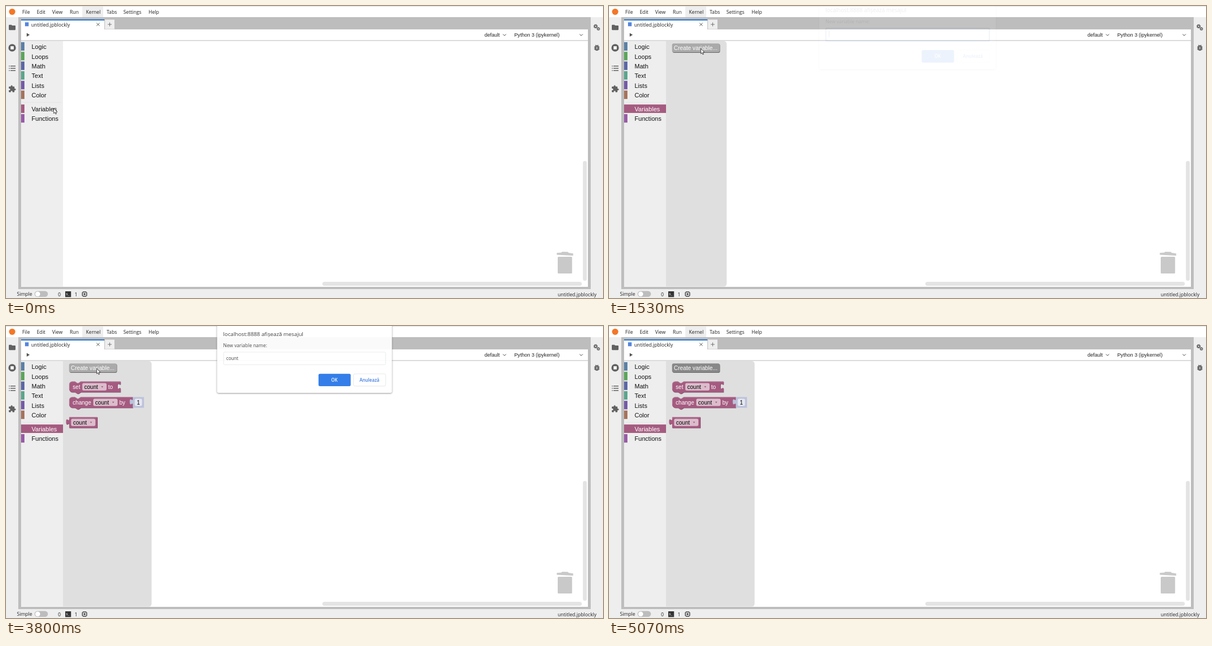
These frames come from a looping animation (1068x524 px, 5.79 s). An HTML page:

```html
<!DOCTYPE html>
<html lang="en">
<head>
<meta charset="utf-8">
<title>Creating a block variable</title>
<style>
  html, body { margin: 0; width: 100%; height: 100%; overflow: hidden; background: #fff; }
  svg { display: block; width: 1068px; height: 524px; }
  text { white-space: pre; }
  .ui { font-family: "Open Sans", "Noto Sans", sans-serif; }
  .arial { font-family: "Liberation Sans", Arial, sans-serif; }
</style>
</head>
<body>
<svg id="stage" viewBox="0 0 1068 524" xmlns="http://www.w3.org/2000/svg"></svg>
<script>
const LOOP = 5790;
const PINK = '#a55b80', ICON = '#616161';

const rect = (x, y, w, h, fill, extra = '') =>
  `<rect x="${x}" y="${y}" width="${w}" height="${h}" fill="${fill}" ${extra}/>`;
const label = (font, size) => (x, y, str, fill = '#212121', extra = '') =>
  `<text class="${font}" font-size="${size}" x="${x}" y="${y}" fill="${fill}" ${extra}>${str}</text>`;
const path = (d, fill, extra = '') => `<path d="${d}" fill="${fill}" ${extra}/>`;
const line = (d, color, width = 1, extra = '') =>
  path(d, 'none', `stroke="${color}" stroke-width="${width}" ${extra}`);
const at = (x, y, scale, body) => `<g transform="translate(${x} ${y}) scale(${scale})">${body}</g>`;

const menuText = label('ui', 8.7);
const kernelText = label('arial', 9.1);
const categoryText = label('arial', 11.1);
const buttonText = label('arial', 10.25);
const blockText = label('arial', 14.67);

function menuBar() {
  const items = [['File', 29], ['Edit', 55], ['View', 82.5], ['Run', 114], ['Kernel', 143],
    ['Tabs', 180], ['Settings', 210], ['Help', 255]];
  return rect(0, 0, 1068, 1, '#e0e0e0') + rect(136.5, 1, 37.5, 19, '#eee') +
    '<circle cx="11" cy="10.3" r="5.6" fill="#f37726"/>' +
    items.map(([name, x]) => menuText(x, 14, name)).join('');
}

function gear(x, y, r) {
  const tooth = 2 * Math.PI * r / 16;
  return `<g fill="none" stroke="${ICON}"><circle cx="${x}" cy="${y}" r="${r * .65}" stroke-width="${r * .55}"/>
    <circle cx="${x}" cy="${y}" r="${r}" stroke-width="${r * .4}" stroke-dasharray="${tooth}"/></g>`;
}

function sideBars() {
  const folder = 'M10 4H4c-1.1 0-2 .9-2 2v12c0 1.1.9 2 2 2h16c1.1 0 2-.9 2-2V8c0-1.1-.9-2-2-2h-8l-2-2z';
  const puzzle = 'M20.5 11H19V7c0-1.1-.9-2-2-2h-4V3.5a2.5 2.5 0 0 0-5 0V5H4c-1.1 0-2 .9-2 2v3.8h1.5' +
    'a2.7 2.7 0 0 1 0 5.4H2V20c0 1.1.9 2 2 2h3.8v-1.5a2.7 2.7 0 0 1 5.4 0V22H17c1.1 0 2-.9 2-2v-4h1.5a2.5 2.5 0 0 0 0-5z';
  const list = [107.8, 111.8, 115.8].map(y => line(`M5.2 ${y}h1.5M8 ${y}h9`, ICON, 1.4)).join('');
  const bug = line('M4 9H20M4 13H20M4 17H20M7.8 3.8L11 7M16.2 3.8L13 7', ICON, 2) +
    rect(6, 5, 12, 16, ICON, 'rx="6"') + line('M10 11h4M10 15h4', '#eee', 2);
  return rect(0, 20, 22, 488, '#eee') + rect(1046, 20, 22, 488, '#eee') +
    at(3.8, 31.3, .6, path(folder, ICON)) +
    `<circle cx="11" cy="75" r="6.7" fill="${ICON}"/>` + rect(8.2, 72.2, 5.6, 5.6, '#fff') +
    list + at(3.8, 141.6, .6, path(puzzle, ICON)) +
    gear(1054.8, 36.4, 3.2) + gear(1059.7, 41, 2.6) + at(1049.8, 67.6, .6, bug);
}

function tabs() {
  return rect(22, 20, 1024, 488, '#bdbdbd') + rect(27, 42, 1014, 462, '#fff') +
    rect(27, 24, 149, 18, '#fff') + rect(27, 24, 149, 2, '#2878cc') +
    rect(34, 29.3, 6.5, 7, '#5585dc') + menuText(45, 37, 'untitled.jpblockly') +
    line('M162 30.4l5.4 5.4M167.4 30.4l-5.4 5.4', '#555', 1) +
    rect(177, 24.5, 17, 17, '#eee') + line('M182 33h7M185.5 29.5v7', '#666', .9) +
    path('M37 48.4l5.4 3.3-5.4 3.3z', '#555') +
    kernelText(856, 54.7, 'default') + kernelText(909.3, 54.7, 'Python 3 (ipykernel)') +
    line('M889 50.5l2.8 2.8 2.8-2.8M1026.2 50.5l2.8 2.8 2.8-2.8', '#444', 1) +
    rect(27, 61.5, 1014, 1, '#b5b8bb');
}

function workspace() {
  return rect(1032, 278, 7, 215, '#e4e4e4', 'rx="3.5"') + rect(566, 495, 464, 7, '#e4e4e4', 'rx="3.5"') +
    rect(987, 450, 25.7, 30, '#c9c9c9', 'rx="1.5"') +
    path('M985.4 443l7.8-.4 2-1.7 9.6.4 2 1.7 7.8 1.1v3.8l-29.2-1.5z', '#c9c9c9');
}

function statusBar() {
  const pins = [-2, 0, 2].map(d => `M${140.5 + d} 512v10M135.5 ${517 + d}h10`).join('');
  return rect(0, 508, 1068, 16, '#eee') + menuText(19.5, 520, 'Simple') +
    rect(51, 511.5, 24, 10.5, '#bdbdbd', 'rx="5.2"') + '<circle cx="56.7" cy="516.8" r="4.4" fill="#fff"/>' +
    menuText(93, 521, '0') + rect(106, 512, 10.3, 10.3, '#333') + label('ui', 6)(107.3, 519.3, '$_', '#fff') +
    menuText(122.8, 521, '1') + line(pins, '#444', .9) +
    rect(136.9, 513.4, 7.2, 7.2, '#eee', 'stroke="#444" stroke-width="1.3" rx="1"') + rect(139, 515.5, 3, 3, '#444') +
    menuText(987, 521, 'untitled.jpblockly');
}

function toolbox() {
  const rows = [['Logic', '#5b80a5'], ['Loops', '#5ba55b'], ['Math', '#5b67a5'], ['Text', '#5ba58c'],
    ['Lists', '#745ba5'], ['Color', '#a5745b'], ['Variables', PINK], ['Functions', '#995ba5']];
  return rect(27, 63, 75, 440.5, '#eee') + rect(30, 172.6, 69, .8, '#e2e2e2') +
    rows.map(([name, color], i) => {
      const y = 64.9 + i * 17.35 + (i > 5 ? 7.7 : 0);
      const mark = i === 6 ? 'id="mark"' : '', word = i === 6 ? 'id="word"' : '';
      return rect(27, y, 6, 15.2, color, mark) + categoryText(45.7, y + 12.4, name, '#111', word);
    }).join('');
}

// Block outlines use workspace units, scaled down on placement.
const NOTCH_TOP = 'l6 4h3l6-4', NOTCH_BOTTOM = 'l-6 4h-3l-6-4';
const SOCKET = 'v5c0 10-8-8-8 7.5s8-2.5 8 7.5V28';
const PLUG = 'V20c0-10-8 8-8-7.5s8 2.5 8-7.5z';
const statement = w =>
  `M0 8a8 8 0 0 1 8-8h7${NOTCH_TOP}H${w}${SOCKET}H30${NOTCH_BOTTOM}H8a8 8 0 0 1-8-8z`;
const value = w => `M0 0H${w}V28H0${PLUG}`;

const solid = (d, shine, color = PINK, dark = '#84496a', light = '#c290a9') =>
  `<g transform="translate(1 1)">${path(d, dark)}</g>` + path(d, color) + line(shine, light, 1);
const dropdown = x => rect(x, 4.5, 63, 19, '#dbbdcc', 'rx="4"') +
  blockText(x + 5, 19, 'count', '#000') + path(`M${x + 49} 12.2h5.4l-2.7 4z`, PINK);

function blocks() {
  const stackShine = w => `M.5 20V8a7.5 7.5 0 0 1 7.5-7.5h7${NOTCH_TOP}H${w}`;
  const setBlock = solid(statement(133), stackShine(133)) +
    blockText(9, 19, 'set', '#fff') + dropdown(34) + blockText(101, 19, 'to', '#fff');
  const changeBlock = solid(statement(165), stackShine(165)) +
    blockText(9, 19, 'change', '#fff') + dropdown(62.5) + blockText(130, 19, 'by', '#fff') +
    at(165, 0, 1, path(value(29), '#bdc2db') + rect(5, 4.5, 19, 19, '#e5e7f1', 'rx="4"') + blockText(10.5, 19, '1', '#000'));
  const getter = solid(value(73), 'M.5 5V.5H73') + dropdown(5);
  return at(113, 99.5, .69, setBlock) + at(113, 127.4, .69, changeBlock) + at(113, 163.4, .69, getter);
}

function flyout() {
  return `<g id="flyout"><path id="flyoutBack" fill="#dfdfdf"/>` +
    rect(113.6, 68, 85, 16, '#666', 'id="buttonShade" rx="3"') +
    rect(112.8, 67.3, 85.2, 15.8, '#888', 'id="button" rx="3"') +
    buttonText(116, 78.6, 'Create variable...', '#fff') + `<g id="blocks">${blocks()}</g></g>`;
}

function dialog() {
  const action = label('ui', 8), middle = 'text-anchor="middle" font-weight="600"';
  return '<g id="dialog">' +
    rect(378, -20, 312, 142.6, '#fff', 'rx="3" style="filter:drop-shadow(0 1px 1.5px rgba(0,0,0,.45))"') +
    label('ui', 9.75)(389, 20.8, 'localhost:8888 afișează mesajul', '#333') +
    label('ui', 8.5)(389, 40.7, 'New variable name:', '#444') +
    rect(389.7, 49.7, 289, 22.6, '#fff', 'id="field" rx="2"') +
    label('ui', 8.1)(394.5, 63.6, '', '#333', 'id="typed"') + rect(395, 54.3, .9, 11.7, '#333', 'id="caret"') +
    rect(559, 88.4, 57.4, 22.3, '#2575e8', 'rx="2.5"') + action(587.3, 102.4, 'OK', '#fff', middle) +
    rect(621.5, 88.6, 57.3, 21.9, '#fff', 'rx="2.5" stroke="#dfe1e5" stroke-width=".8"') +
    action(649.8, 102.4, 'Anulează', '#2f70df', middle) + '</g>';
}

const pointer = '<g id="pointer">' + path('M.3.3V9.8L2.4 7.8 3.8 11 5.3 10.4 3.9 7.2H6.8Z', '#fff',
  'stroke="#111" stroke-width=".75" stroke-linejoin="round"') + '</g>';

const stage = document.getElementById('stage');
stage.innerHTML = menuBar() + tabs() + sideBars() + workspace() + statusBar() + toolbox() +
  flyout() + dialog() + pointer;

const part = id => document.getElementById(id);
const set = (id, attrs) => { for (const k in attrs) part(id).setAttribute(k, attrs[k]); };
const show = (id, on) => set(id, { visibility: on ? 'inherit' : 'hidden' });
const latest = (steps, t) => steps.filter(s => s[0] <= t).pop();

const keys = [[0, ''], [2470, 'c'], [2670, 'co'], [2930, 'cou'], [3070, 'coun'], [3200, 'count']];
// time, opacity, rise, growth
const fades = [[0, 0, 0, 0], [1530, .08, 10.5, .012], [1600, .6, 4, .005], [1670, 1, 0, 0],
  [3730, .98, 1, .001], [3800, .93, 3, .003], [3870, .8, 6, .005], [3930, .35, 9, .009], [4000, 0, 0, 0]];
const rests = [[0, 85, 183], [70, 83, 186], [1270, 164, 76], [1600, 162, 76], [4730, 159, 88],
  [4800, 151, 150], [4870, 137, 245], [4930, 118, 355], [5000, 89, 515], [5070, 89, 540]];

function pointerAt(t) {
  if (t < 670 || t >= 1270) return latest(rests, t).slice(1);
  const p = Math.min(9, Math.floor((t - 670) / 66.2) + 1) / 9;
  const e = p * p * (3 - 2 * p);
  return [83 + 80 * e, 186 - 105 * e];
}

function render(t) {
  const open = t >= 530, made = t >= 3800, hover = t >= 1270 && t < 4730;
  set('mark', { width: open ? 75 : 6 });
  set('word', { fill: open ? '#fff' : '#111' });
  show('flyout', open);
  show('blocks', open && made);
  set('flyoutBack', { d: `M102 63H${made ? 255 : 205}q5.5 0 5.5 5.5V498q0 5.5-5.5 5.5H102z` });
  set('button', { fill: hover ? '#aaa' : '#888' });

  const [, opacity, rise, growth] = latest(fades, t);
  show('dialog', opacity > 0);
  set('dialog', { opacity, transform: `translate(${-534 * growth} ${-rise}) scale(${1 + growth})` });
  const focus = t < 3730;
  set('field', { stroke: focus ? '#2a69cf' : '#e3e5e8', 'stroke-width': focus ? 1.6 : .8 });
  part('typed').textContent = latest(keys, t)[1];
  const typing = t >= 2470;
  set('caret', { x: 394.9 + (typing ? part('typed').getComputedTextLength() : 0) });
  show('caret', opacity > 0 && focus && (t < 2070 || typing));

  const [x, y] = pointerAt(t);
  set('pointer', { transform: `translate(${x} ${y})` });
}

let start;
function tick(now) {
  start ??= now;
  render((now - start) % LOOP);
  requestAnimationFrame(tick);
}
render(0);
requestAnimationFrame(tick);
</script>
</body>
</html>
```
